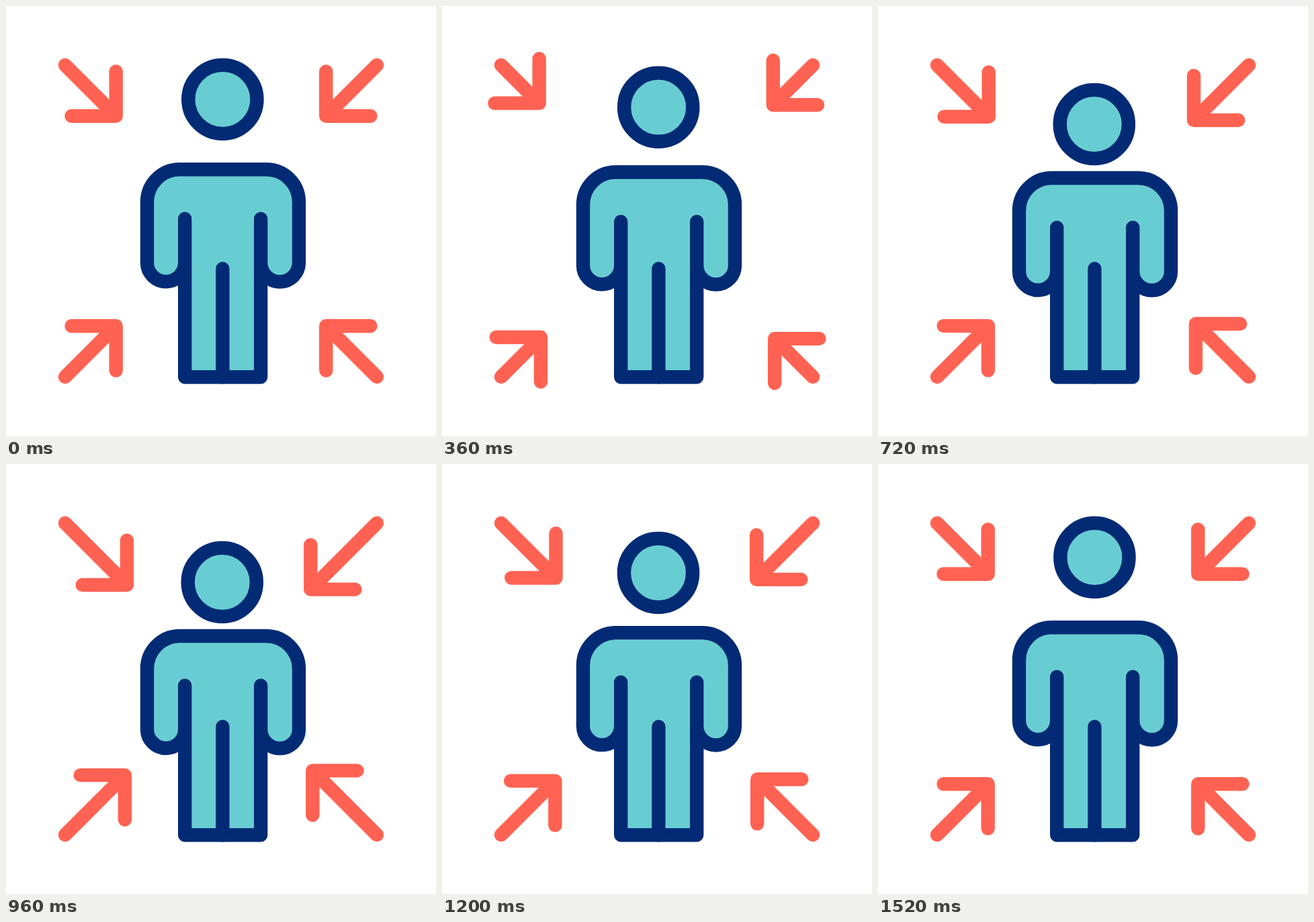
An HTML page for the animation above (1.56 s loop, 640 by 640 pixels).

```html
<!DOCTYPE html>
<html lang="en">
<head>
<meta charset="utf-8">
<title>Assembly point</title>
<style>
  html, body { margin: 0; width: 100%; height: 100%; overflow: hidden; background: #fff; }
  svg { display: block; width: 100vw; height: 100vh; }
  path, circle { stroke: #032b75; stroke-width: 20.4; stroke-linecap: round; stroke-linejoin: round; fill: none; }
  #head, #body { fill: #68cdd2; }
  .arrow { stroke: #ff6252; }
</style>
</head>
<body>
<svg viewBox="0 0 640 640">
  <path id="body"/>
  <path d="M322.4 391V552.2"/>
  <circle id="head" cx="322.4" cy="139" r="51.1"/>
</svg>
<script>
const LOOP = 1560, STEP = 40, ARM = 66.2;
const svg = document.querySelector('svg');
const head = document.getElementById('head');
const body = document.getElementById('body');

// sx, sy: direction towards the centre; out, into: travel away from and towards it
const arrows = [
  { sx: 1, sy: 1, out: -22.5, into: 16.3 },
  { sx: -1, sy: 1, out: -19.5, into: 23 },
  { sx: 1, sy: -1, out: -19.8, into: 13.2 },
  { sx: -1, sy: -1, out: -22.3, into: 20 }
];
for (const a of arrows) {
  a.el = document.createElementNS('http://www.w3.org/2000/svg', 'path');
  a.el.setAttribute('class', 'arrow');
  svg.append(a.el);
}

// cubic-bezier(.42, 0, .58, 1)
function ease(x) {
  let lo = 0, hi = 1;
  for (let i = 0; i < 24; i++) {
    const s = (lo + hi) / 2, r = 1 - s;
    if (1.26 * s * r * r + 1.74 * s * s * r + s * s * s < x) lo = s; else hi = s;
  }
  return lo * lo * (3 - 2 * lo);
}

// keys: [time, value] pairs, eased in between
function track(t, keys) {
  if (t <= keys[0][0]) return keys[0][1];
  for (let i = 1; i < keys.length; i++) {
    const [t0, v0] = keys[i - 1], [t1, v1] = keys[i];
    if (t < t1) return v0 + (v1 - v0) * ease((t - t0) / (t1 - t0));
  }
  return keys[keys.length - 1][1];
}

function arrowPath({ sx, sy }, shift) {
  const x = d => 320 + sx * d, y = d => 320 + sy * d;
  const tip = -156.3 + shift, end = tip - ARM;
  return `M${x(-232)} ${y(-232)}L${x(tip)} ${y(tip)}` +
    `M${x(end)} ${y(tip)}H${x(tip)}V${y(end)}`;
}

function bodyPath(d) {
  return `M379.2 ${316.8 + d}V552.2H266.2V${316.8 + d}` +
    `M266.2 ${382.1 + d}a28.1 28.1 0 0 1 -56.2 0V${291.8 + d}` +
    `a48.6 48.6 0 0 1 48.6 -48.6H387.4a48.6 48.6 0 0 1 48.6 48.6` +
    `V${382.1 + d}a28.4 28.4 0 0 1 -56.8 0`;
}

function draw(t) {
  const drop = track(t, [[200, 0], [610, 1], [975, 1], [1500, 0]]);
  head.setAttribute('transform', `translate(${-0.6 * drop} ${37 * drop})`);
  body.setAttribute('d', bodyPath(12.8 * drop));
  for (const a of arrows) {
    const shift = track(t, [[80, 0], [465, a.out], [495, a.out], [895, a.into], [945, a.into], [1380, 0]]);
    a.el.setAttribute('d', arrowPath(a, shift));
  }
}

const start = performance.now();
function tick() {
  const t = (performance.now() - start) % LOOP;
  draw(Math.floor(t / STEP) * STEP);
  requestAnimationFrame(tick);
}
tick();
</script>
</body>
</html>
```
